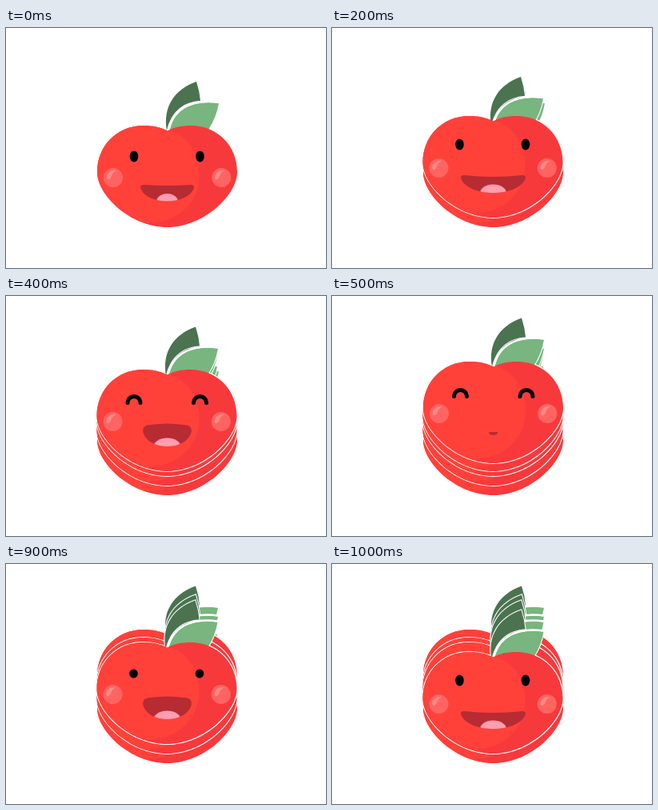
An HTML page with a canvas that plays this animation: 400x300 px, repeating every 1.1 s.

```html
<!DOCTYPE html>
<html lang="en">
<head>
<meta charset="utf-8">
<title>Jumping apple</title>
<style>
  html, body { margin: 0; height: 100%; overflow: hidden; background: #fff; }
  canvas { display: block; }
</style>
</head>
<body>
<canvas id="stage" width="400" height="300"></canvas>
<script>
const ctx = document.getElementById('stage').getContext('2d');
const LOOP = 1100;

const body = new Path2D(
  'M202 128.5 C193 124 183 122 172 122 C138 122 114 148 114 180' +
  'C114 209 156 249 202 249 C247 249 289 209 289 180' +
  'C289 148 265 122 231 122 C220 122 210 124 202 128.5Z');
const lit = new Path2D(
  'M100 110 H202 V127 C228 134 242 157 242 183 C242 219 212 244 180 243 L180 260 H100Z');
const darkLeaf = new Path2D(
  'M201 128 C196 99 210 77 238 67 Q242 79 243 91 C223 92 207 103 201 128Z');
const lightLeaf = new Path2D(
  'M204 130 C209 103 231 89 266 94 Q263 112 253 127 L240 132Z');
const leafRim = new Path2D('M203 129 C208 102 231 88 266 93');

// dy: body lift; leaf: offset; eye: [y, ry] or [y] when smiling
// mouth: [half width, top, bottom, corner, sag]; tongue: [half width, height]
const rest = { at: 0, dx: 0, dy: 0, leaf: [0, 0], eye: [160.5, 7],
  mouth: [34, 196, 216.5, 5, 2], tongue: [13.5, 10] };
const low = { at: 200, dx: -.5, dy: -12, leaf: [-2, -6], eye: [145.5, 7],
  mouth: [41, 184, 206, 5, 4], tongue: [16.5, 11] };
const mid = { at: 300, dx: -.5, dy: -24, leaf: [-1.5, -21.5], eye: [137, 5.5],
  mouth: [31, 167, 194, 10, -3], tongue: [17, 11] };
const high = { at: 400, dx: -.5, dy: -30, leaf: [-1, -28.5], eye: [133.5],
  mouth: [31, 161, 188, 10, -3], tongue: [17, 11] };
const peak = { at: 500, dx: 0, dy: -40, leaf: [-1, -39.5], eye: [125.5],
  mouth: [6, 170, 174, 1.5, 0], tongue: [0, 0] };
const poses = [rest, low, mid, high, peak,
  { ...high, at: 800 }, { ...mid, at: 900 },
  { ...low, at: 1000, leaf: [-1.5, -9.5] }];

function shifted(x, y, draw) {
  ctx.save();
  ctx.translate(x, y);
  draw();
  ctx.restore();
}

function fill(color, path) {
  ctx.fillStyle = color;
  ctx.fill(path);
}

function oval(color, x, y, rx, ry) {
  ctx.beginPath();
  ctx.ellipse(x, y, rx, ry, 0, 0, 7);
  ctx.fillStyle = color;
  ctx.fill();
}

function drawLeaves() {
  fill('#4b7350', darkLeaf);
  fill('#78b57f', lightLeaf);
  ctx.lineWidth = 2.5;
  ctx.stroke(leafRim);
}

function drawCheek(x) {
  oval('#ff6462', x, 187, 12, 12);
  fill('#ff8a87', new Path2D(
    `M${x - 8} 188 C${x - 9} 182 ${x - 3} 177 ${x + 4} 178` +
    `C${x} 180 ${x - 2} 183 ${x - 3} 187 Q${x - 6} 191 ${x - 8} 188Z`));
}

function drawBody() {
  fill('#f8393c', body);
  ctx.save();
  ctx.clip(body);
  fill('#ff413a', lit);
  ctx.restore();
  drawCheek(134);
  drawCheek(269.3);
}

function drawEye(x, [y, ry]) {
  if (ry) return oval('#000', x, y, 5.3, ry);
  ctx.beginPath();
  ctx.arc(x + .5, y, 8, Math.PI, 0);
  ctx.lineWidth = 5;
  ctx.lineCap = 'round';
  ctx.strokeStyle = '#000';
  ctx.stroke();
}

function drawMouth([w, y, bottom, corner, sag], [tw, th]) {
  const side = y + corner;
  const bend = side + (bottom - side) * .65;
  const lips = new Path2D(
    `M${corner - w} ${y} Q0 ${y + sag} ${w - corner} ${y}` +
    `Q${w + 1} ${y} ${w - 1} ${side}` +
    `C${w * .85} ${bend} ${w * .45} ${bottom} 0 ${bottom}` +
    `C${-w * .45} ${bottom} ${-w * .85} ${bend} ${1 - w} ${side}` +
    `Q${-w - 1} ${y} ${corner - w} ${y}Z`);
  fill('#b72b33', lips);
  ctx.clip(lips);
  oval('#ff9eb0', 0, bottom + .5, tw, th);
}

function drawApple(p) {
  const [lx, ly] = p.leaf;
  ctx.strokeStyle = '#fff';
  ctx.lineWidth = 2.2;
  shifted(p.dx, p.dy, () => ctx.stroke(body));
  shifted(lx, ly, () => {
    ctx.stroke(darkLeaf);
    ctx.stroke(lightLeaf);
    drawLeaves();
  });
  shifted(p.dx, p.dy, drawBody);
  shifted(p.dx, 0, () => {
    drawEye(160, p.eye);
    drawEye(242.5, p.eye);
  });
  shifted(201.5, 0, () => drawMouth(p.mouth, p.tongue));
}

// Each pose is stamped over the earlier ones, leaving a trail until the loop restarts.
function render(now) {
  const t = now % LOOP;
  ctx.fillStyle = '#fff';
  ctx.fillRect(0, 0, 400, 300);
  poses.filter(p => p.at <= t).forEach(drawApple);
}

const start = performance.now();
function tick() {
  render(performance.now() - start);
  requestAnimationFrame(tick);
}
tick();
</script>
</body>
</html>
```
